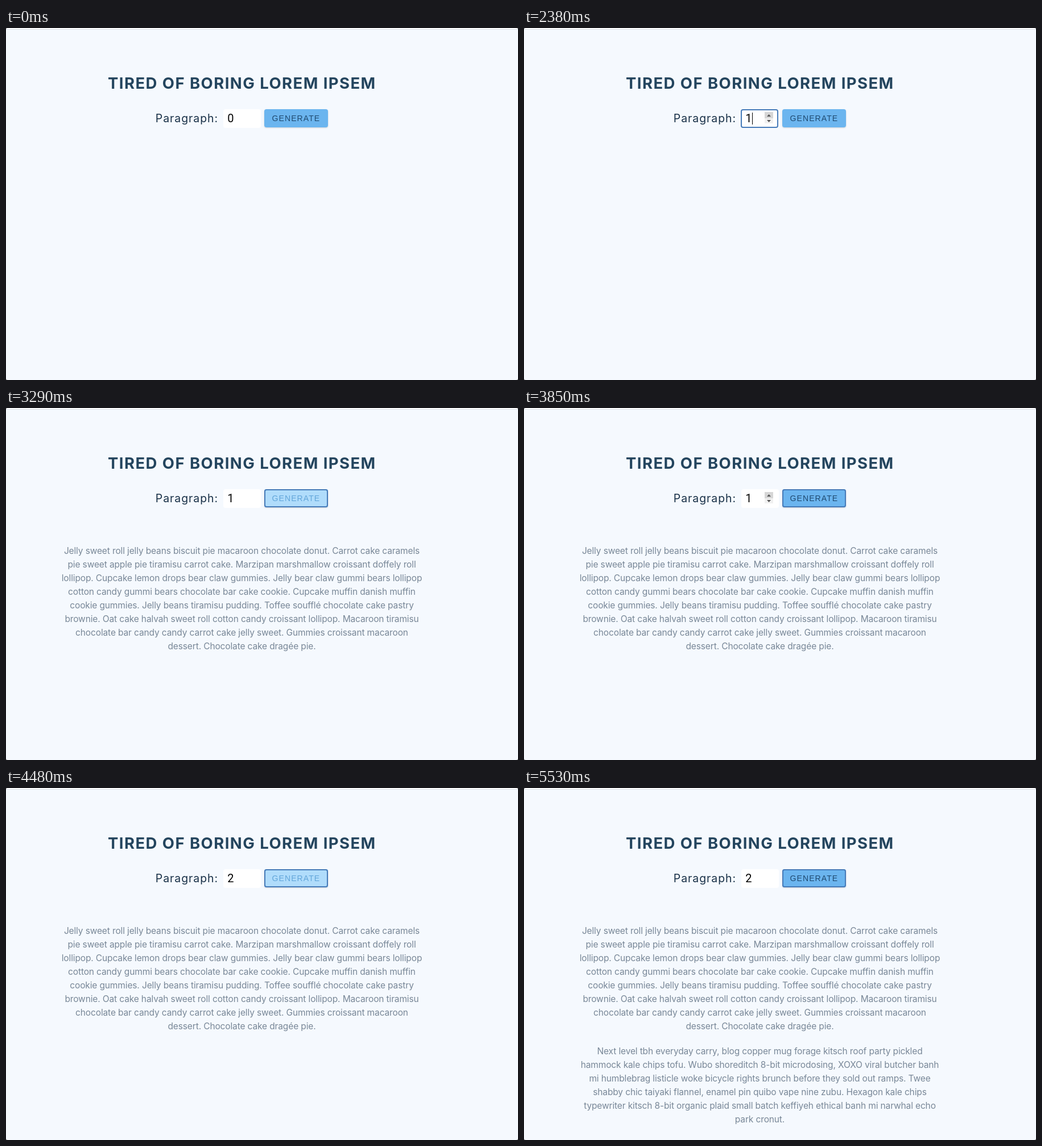
An HTML page that plays this animation: 900 by 620 pixels, repeating every 5.67 s.

```html
<!DOCTYPE html>
<html lang="en">
<head>
<meta charset="utf-8">
<title>Lorem generator</title>
<style>
  html, body { margin: 0; width: 100%; height: 100%; overflow: hidden; background: #f5f9fe; }
  svg { display: block; width: 900px; height: 620px; }
  text { font-family: Inter, sans-serif; }
  .title { font-size: 27.5px; font-weight: 700; letter-spacing: 1.43px; fill: #24455e; }
  .label { font-size: 19.4px; letter-spacing: .98px; fill: #183047; }
  .value { font: 20px Roboto, sans-serif; fill: #000; }
  .caption { font: 14px "Liberation Sans", Arial, sans-serif; letter-spacing: 1.08px; fill: #1f4a70; }
  .button { fill: #6bb5ef; filter: drop-shadow(0 1px 1px rgba(0, 0, 0, .16)); }
  .ring { fill: none; stroke: #467bb9; stroke-width: 2; }
  .para { font-size: 15.5px; letter-spacing: -.13px; text-anchor: middle; fill: #788797; }
</style>
</head>
<body>
<svg viewBox="0 0 900 620">
  <rect width="900" height="620" fill="#777"/>
  <rect width="900" height="620" rx="3" fill="#f5f9fe"/>
  <rect x="2" width="896" height="2" fill="#fdfeff"/>
  <rect y="2" width="900" height="1" fill="#dde2e7"/>

  <text class="title" x="179" y="107">TIRED OF BORING LOREM IPSEM</text>
  <text class="label" x="262.8" y="166">Paragraph:</text>

  <rect x="382" y="143" width="66" height="33" rx="4" fill="#fff"/>
  <text id="value" class="value" x="389.3" y="166">0</text>
  <g id="spinner">
    <rect x="423" y="148" width="15" height="20" fill="#f1f1f1"/>
    <rect x="423" y="148" width="15" height="11" fill="#d6d6d6"/>
    <path d="M427 156l3.5-4 3.5 4zM427 162l3.5 4 3.5-4z" fill="#555"/>
  </g>
  <g id="focus">
    <rect class="ring" x="382" y="144" width="64" height="31" rx="3"/>
    <rect x="401" y="149" width="1" height="21"/>
  </g>

  <rect class="button" x="454" y="143" width="112" height="32" rx="4"/>
  <text class="caption" x="467.6" y="164">GENERATE</text>
  <g id="hover">
    <rect x="454" y="143" width="112" height="32" rx="4" fill="#b0dcfb"/>
    <text class="caption" x="467.6" y="164" style="fill:#62a6da">GENERATE</text>
  </g>
  <rect id="ring" class="ring" x="455" y="144" width="110" height="30" rx="3"/>

  <g id="first" class="para"></g>
  <g id="second" class="para"></g>
</svg>
<script>
const LOOP = 5670, STEP = 70, FADE = 280;
const el = id => document.getElementById(id);

function addLines(id, top, text) {
  el(id).innerHTML = text.trim().split("\n")
    .map((line, i) => `<text x="414.5" y="${top + 24 * i}">${line.trim()}</text>`).join("");
}

addLines("first", 257, `
  Jelly sweet roll jelly beans biscuit pie macaroon chocolate donut. Carrot cake caramels
  pie sweet apple pie tiramisu carrot cake. Marzipan marshmallow croissant doffely roll
  lollipop. Cupcake lemon drops bear claw gummies. Jelly bear claw gummi bears lollipop
  cotton candy gummi bears chocolate bar cake cookie. Cupcake muffin danish muffin
  cookie gummies. Jelly beans tiramisu pudding. Toffee soufflé chocolate cake pastry
  brownie. Oat cake halvah sweet roll cotton candy croissant lollipop. Macaroon tiramisu
  chocolate bar candy candy carrot cake jelly sweet. Gummies croissant macaroon
  dessert. Chocolate cake dragée pie.`);

addLines("second", 469, `
  Next level tbh everyday carry, blog copper mug forage kitsch roof party pickled
  hammock kale chips tofu. Wubo shoreditch 8-bit microdosing, XOXO viral butcher banh
  mi humblebrag listicle woke bicycle rights brunch before they sold out ramps. Twee
  shabby chic taiyaki flannel, enamel pin quibo vape nine zubu. Hexagon kale chips
  typewriter kitsch 8-bit organic plaid small batch keffiyeh ethical banh mi narwhal echo
  park cronut.`);

// Each pair is a [start, end) span in ms.
const spans = {
  spinner: [[1610, 2450], [3710, 4200]],
  focus: [[1890, 2660], [3920, 4410]],
  ring: [[2660, 3920], [4410, LOOP]],
  first: [[2730, LOOP]],
  second: [[4550, LOOP]]
};
const hovers = [[2450, 3360], [4200, 5040]];

const within = (t, list) => list.some(([from, to]) => t >= from && t < to);
const clamp = v => Math.max(0, Math.min(1, v));

function draw(now) {
  const t = Math.floor(now % LOOP / STEP) * STEP;
  for (const id in spans) el(id).style.display = within(t, spans[id]) ? "" : "none";
  el("value").textContent = t < 1890 ? 0 : t < 3920 ? 1 : 2;
  el("hover").style.opacity = hovers.reduce((sum, [from, to]) =>
    sum + clamp((t - from) / FADE) - clamp((t - to) / FADE), 0);
}

let start;
function frame(now) {
  start ??= now;
  draw(now - start);
  requestAnimationFrame(frame);
}
requestAnimationFrame(frame);
</script>
</body>
</html>
```
